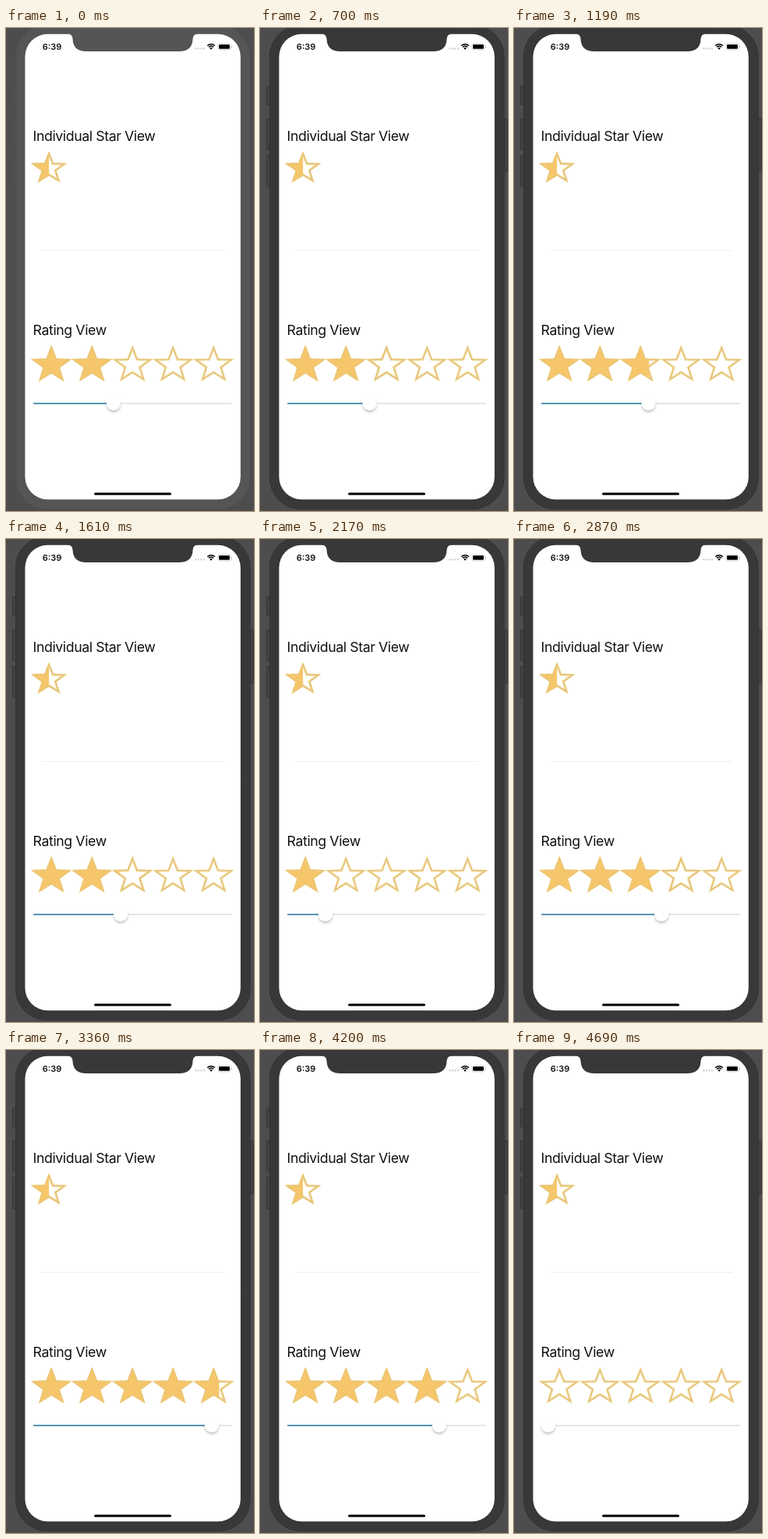
Animation, 318 px wide and 620 px high, one loop 5670 ms. Source, as an HTML page with a canvas:

```html
<!DOCTYPE html>
<html lang="en">
<head>
<meta charset="utf-8">
<title>Star rating</title>
<style>
  html, body { margin: 0; width: 100%; height: 100%; overflow: hidden; background: #4d4d4d; }
  canvas { display: block; width: 318px; height: 620px; }
</style>
</head>
<body>
<canvas id="stage"></canvas>
<script>
const W = 318, H = 620, LOOP = 5670, STEP = 70, LAST = 4690, FOCUS = 700;
const GOLD = '#f6c66b', EDGE = '#e6c47a', HALO = '#fcf4da';
const KNOB_MIN = 44, KNOB_MAX = 281;

const canvas = document.getElementById('stage');
const c = canvas.getContext('2d');
const dpr = window.devicePixelRatio || 1;
canvas.width = W * dpr;
canvas.height = H * dpr;

const smooth = u => u * u * (3 - 2 * u);
const easeOut = u => 1 - (1 - u) * (1 - u);

// The finger drags the knob in a few eased swipes.
function knobAt(t) {
  let x = 138;
  const swipe = (from, to, target, ease = smooth) => {
    const u = Math.min(Math.max((t - from) / (to - from), 0), 1);
    x += (target - x) * ease(u);
  };
  swipe(630, 910, 155);
  swipe(980, 1400, 190);
  swipe(1470, 2100, 81, easeOut);
  swipe(2100, 2800, 187);
  swipe(2800, 3570, KNOB_MAX);
  swipe(3990, LAST, KNOB_MIN);
  return x;
}

function rect(x, y, w, h, color) {
  c.fillStyle = color;
  c.fillRect(x, y, w, h);
}

function roundRect(x, y, w, h, r, fill, stroke) {
  c.beginPath();
  c.roundRect(x, y, w, h, r);
  if (stroke) {
    c.strokeStyle = stroke;
    c.lineWidth = 1;
    c.stroke();
  }
  if (fill) {
    c.fillStyle = fill;
    c.fill();
  }
}

function text(str, x, y, font, spacing) {
  c.font = font + ' Inter, Roboto, sans-serif';
  c.letterSpacing = spacing;
  c.fillStyle = '#111';
  c.fillText(str, x, y);
}

function starPath(cx, top, w, h) {
  const rx = w / 1.902, ry = h / 1.809, path = new Path2D();
  for (let i = 0; i < 10; i++) {
    const a = i * Math.PI / 5, k = i % 2 ? 0.41 : 1;
    path.lineTo(cx + rx * k * Math.sin(a), top + ry - ry * k * Math.cos(a));
  }
  path.closePath();
  return path;
}

function star(cx, top, w, h, amount) {
  const path = starPath(cx, top, w, h);
  const outline = (color, width) => {
    c.strokeStyle = color;
    c.lineWidth = width;
    c.stroke(path);
  };
  c.save();
  c.lineJoin = 'round';
  outline(HALO, 2);
  c.clip(path);
  c.lineJoin = 'miter';
  rect(cx - w / 2, top, w, h, '#fff');
  outline(HALO, 6.5);
  outline(EDGE, 4.2);
  if (amount > 0) {
    rect(cx - w / 2, top, w * Math.min(amount, 1), h, GOLD);
    outline(EDGE, 2);
  }
  c.restore();
}

function phone(active) {
  const body = active ? '#383838' : '#555';
  const line = active ? '#292929' : '#4a4a4a';
  const button = active ? '#424242' : '#4f4f4f';
  rect(0, 0, W, H, '#4d4d4d');
  roundRect(8.5, 74.5, 5, 24, 1.5, button, line);
  roundRect(8.5, 116.5, 5, 40, 1.5, button, line);
  roundRect(8.5, 163.5, 5, 40, 1.5, button, line);
  roundRect(312.5, 116.5, 5, 68, 1.5, button, line);
  roundRect(12.5, -3.5, 300.5, 621, 40, body, line);
  roundRect(24.4, 7.8, 276.4, 597.4, 29, '#fff', line);

  c.beginPath();
  c.moveTo(78, 7);
  c.quadraticCurveTo(85.5, 8, 85.5, 14);
  c.quadraticCurveTo(86, 30, 103, 30);
  c.lineTo(222, 30);
  c.quadraticCurveTo(239, 30, 239.5, 14);
  c.quadraticCurveTo(239.5, 8, 247, 7);
  c.fillStyle = body;
  c.fill();
}

function statusBar() {
  text('6:39', 46.8, 27.7, '600 11px', '0px');

  c.fillStyle = '#c8c8c8';
  for (let i = 0; i < 4; i++) {
    c.beginPath();
    c.arc(243.3 + i * 3.5, 26.4, 1.1, 0, 7);
    c.fill();
  }

  const fan = (r, y) => c.arc(263, y, r, -Math.PI * 0.75, -Math.PI * 0.25);
  c.strokeStyle = c.fillStyle = '#000';
  c.lineWidth = 1.5;
  for (const r of [6.8, 4.3]) {
    c.beginPath();
    fan(r, 27.6);
    c.stroke();
  }
  c.beginPath();
  c.moveTo(263, 27.8);
  fan(2.6, 27.8);
  c.fill();

  roundRect(271.8, 20, 16.3, 8, 2.2, null, '#d2d2d2');
  roundRect(273, 21.2, 13.8, 5.6, 1.2, '#000');
  roundRect(289, 22.8, 1, 2.6, 0.5, '#c0c0c0');
}

function slider(x) {
  roundRect(35, 481, 255, 2, 1, '#e6e6e8');
  roundRect(35, 481, x - 35, 2, 1, '#5596b4');
  c.save();
  c.shadowColor = 'rgba(0,0,0,0.22)';
  c.shadowBlur = 3 * dpr;
  c.shadowOffsetY = 2.2 * dpr;
  c.beginPath();
  c.arc(x, 481.8, 9.2, 0, 7);
  c.fillStyle = '#fff';
  c.fill();
  c.restore();
}

function draw(t) {
  const x = knobAt(t);
  const rating = 5 * (x - KNOB_MIN) / (KNOB_MAX - KNOB_MIN);
  c.setTransform(dpr, 0, 0, dpr, 0, 0);
  phone(t >= FOCUS);
  statusBar();

  text('Individual Star View', 34.6, 145.3, '400 17.7px', '-0.4px');
  star(55.1, 158.7, 45.4, 39.4, 0.5);
  rect(46, 285, 234, 1, '#f0f0f0');

  text('Rating View', 34.6, 394, '400 17.7px', '-0.4px');
  for (let i = 0; i < 5; i++) star(58.2 + i * 52, 407.5, 51.6, 45.8, rating - i);
  slider(x);
  roundRect(113, 596.4, 99, 3, 1.5, '#000');
}

const start = performance.now();
function tick() {
  const t = (performance.now() - start) % LOOP;
  draw(Math.min(Math.floor(t / STEP) * STEP, LAST));
  requestAnimationFrame(tick);
}
tick();
</script>
</body>
</html>
```
